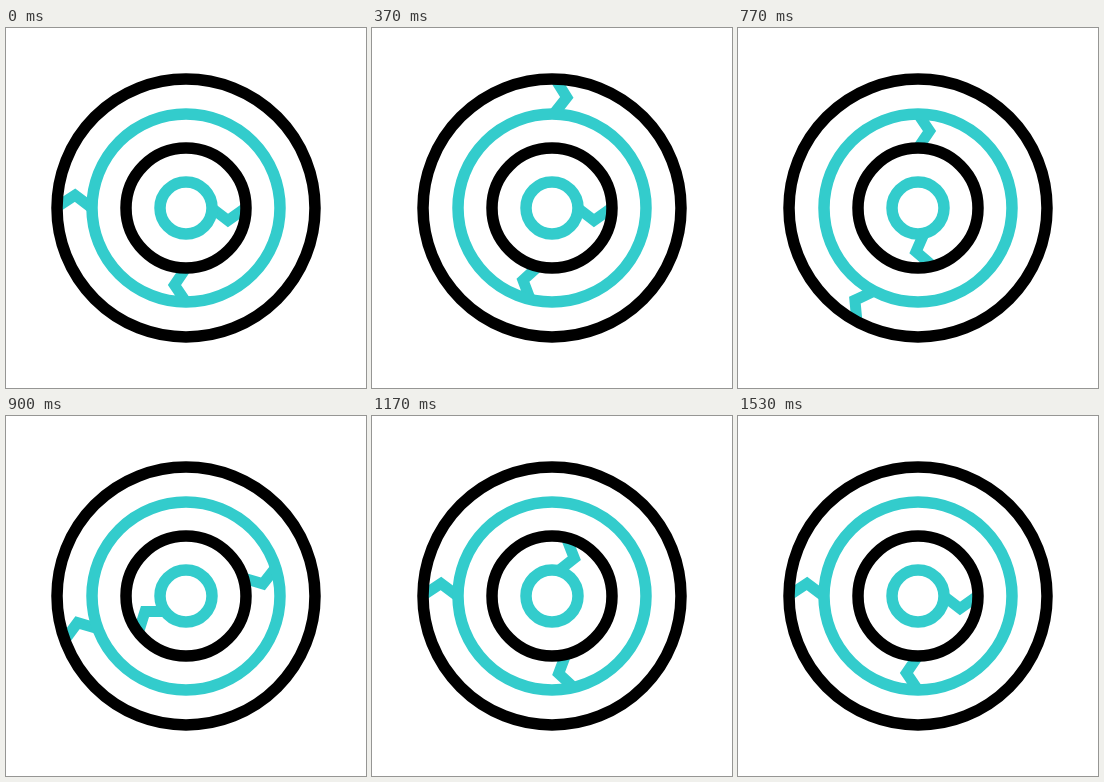
Recreate the animation shown at these times as an HTML page with a canvas. Size 360 by 360 pixels, loop 1670 ms.

```html
<!DOCTYPE html>
<html lang="en">
<head>
<meta charset="utf-8">
<title>Rotating rings</title>
<style>
  html, body { margin: 0; width: 100%; height: 100%; overflow: hidden; background: #fff; }
  canvas { display: block; width: 360px; height: 360px; }
</style>
</head>
<body>
<canvas id="stage" width="360" height="360"></canvas>
<script>
const ctx = document.getElementById('stage').getContext('2d');
const LOOP = 1670;
const TURN_STEPS = 33;
const TEAL = '#33cccc';
const BLACK = '#000';

// Points are relative to the centre; start is in steps of 1/30 s.
const cracks = [
  { start: -0.5, points: [[-130, 0], [-111, -12.5], [-93, 1]] },
  { start: 6.5, points: [[0, 60], [-11.5, 77], [0, 94]] },
  { start: 12.5, points: [[27, 1], [42, 12.5], [61, -1]] }
];

const bezier = (u, a, b) => 3 * (1 - u) ** 2 * u * a + 3 * (1 - u) * u * u * b + u ** 3;

function easeInOut(x) {
  if (x <= 0) return 0;
  if (x >= 1) return 1;
  let low = 0, high = 1;
  for (let i = 0; i < 24; i++) {
    const mid = (low + high) / 2;
    if (bezier(mid, 0.42, 0.58) < x) low = mid;
    else high = mid;
  }
  return bezier(low, 0, 1);
}

function ring(radius, color) {
  ctx.strokeStyle = color;
  ctx.lineWidth = 11.5;
  ctx.beginPath();
  ctx.arc(0, 0, radius, 0, Math.PI * 2);
  ctx.stroke();
}

function crack({ start, points }, step) {
  ctx.save();
  ctx.rotate(easeInOut((step - start) / TURN_STEPS) * Math.PI * 2);
  ctx.strokeStyle = TEAL;
  ctx.lineWidth = 11;
  ctx.beginPath();
  for (const [x, y] of points) ctx.lineTo(x, y);
  ctx.stroke();
  ctx.restore();
}

function draw(time) {
  // The motion advances in hard steps at 30 per second.
  const step = Math.floor((time % LOOP) * 0.03 + 0.15);
  ctx.setTransform(1, 0, 0, 1, 0, 0);
  ctx.fillStyle = '#fff';
  ctx.fillRect(0, 0, 360, 360);
  ctx.translate(180, 180);
  for (const c of cracks) crack(c, step);
  ring(94, TEAL);
  ring(26, TEAL);
  ring(129, BLACK);
  ring(60, BLACK);
}

let origin;
function tick(now) {
  origin ??= now;
  draw(now - origin);
  requestAnimationFrame(tick);
}
draw(0);
requestAnimationFrame(tick);
</script>
</body>
</html>
```
